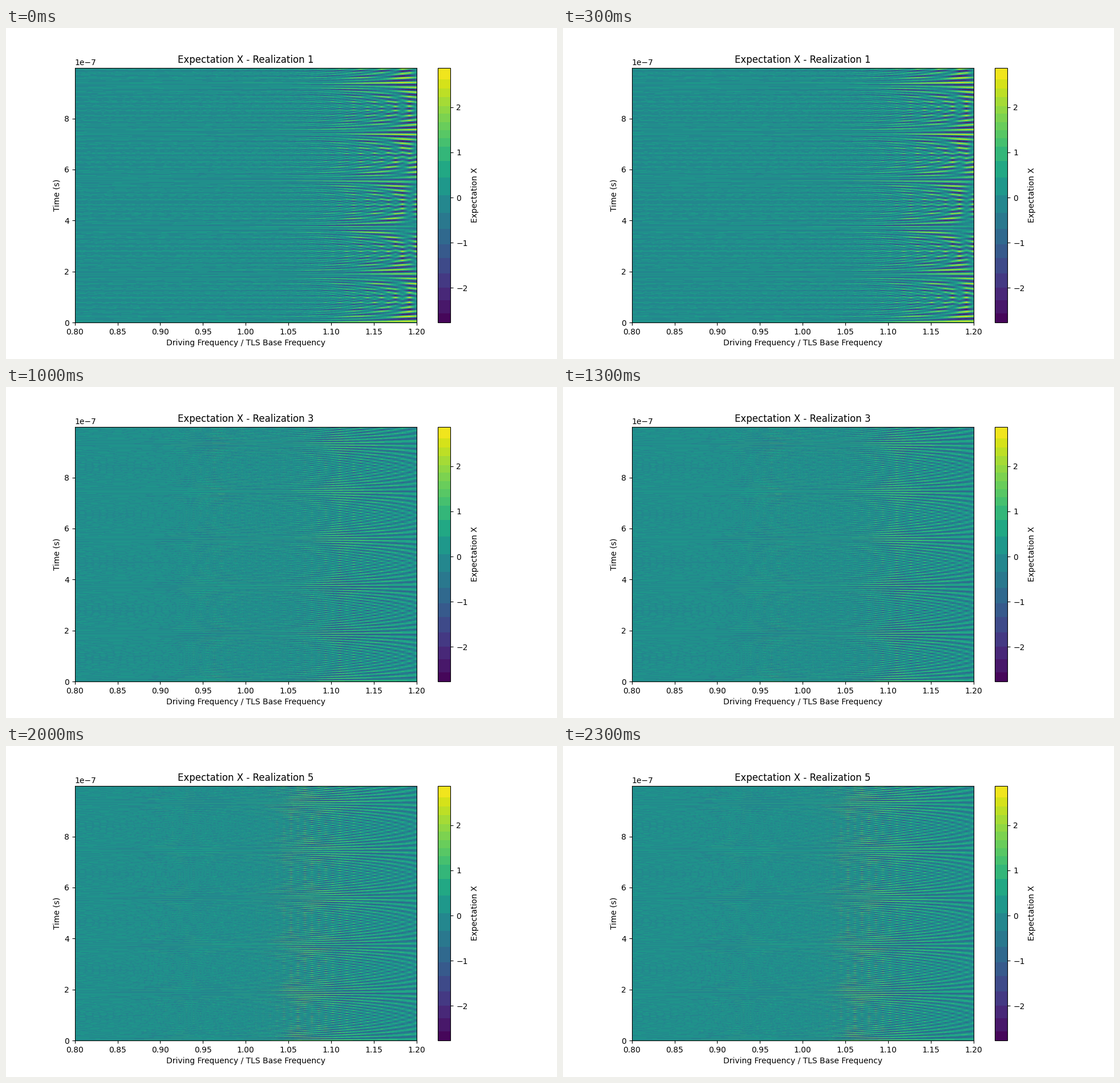
A matplotlib script for the animation above (2.5 s loop, 966x580 px).

```python
import numpy as np
import matplotlib.pyplot as plt
from matplotlib.animation import FuncAnimation
from matplotlib.colors import ListedColormap

V_MIN, V_MAX = -2.77, 2.875
T_END = 0.999e-6
DRIVE_RIGHT, DRIVE_SLOPE = 48e6, 658e6   # Hz at ratio 1.2, Hz per unit ratio

# Per realization: share of free oscillation, then modes as
# (resonance ratio, amplitude, width below, width above)
REALIZATIONS = [
    (1.0, [(1.19, 1.15, 0.030, 0.03), (1.13, 0.45, 0.03, 0.03)]),
    (0.6, [(1.18, 1.05, 0.030, 0.05), (1.02, 0.40, 0.03, 0.03)]),
    (0.2, [(1.11, 1.05, 0.040, 0.08), (0.965, 0.50, 0.025, 0.02)]),
    (0.5, [(1.19, 1.15, 0.040, 0.04), (0.99, 0.35, 0.05, 0.03),
           (0.94, 0.25, 0.03, 0.03)]),
    (0.2, [(1.06, 1.35, 0.018, 0.08), (0.92, 0.35, 0.06, 0.04)]),
]


def banded_viridis():
    """Viridis reduced to flat bands, finer towards yellow."""
    rows = np.array([516, 499, 477, 455, 430, 403, 379, 352, 324, 293, 262,
                     233, 208, 193, 179, 165, 150, 137, 121, 106, 90, 69.6])
    edges = (516 - rows) / (516 - 69.6)
    mids = (edges[1:] + edges[:-1]) / 2
    steps = (np.arange(512) + 0.5) / 512
    band = np.digitize(steps, edges[1:-1])
    return ListedColormap(plt.get_cmap("viridis")(mids[band]))


def drive_freq(ratio):
    return DRIVE_RIGHT + DRIVE_SLOPE * (1.2 - ratio)


def expectation(index):
    """Response on a coarse ratio grid, blended linearly between columns."""
    free, modes = REALIZATIONS[index]
    ratio = np.linspace(0.8, 1.2, 50)
    t = np.linspace(0, T_END, 1000)[:, None]
    driven = np.sin(2 * np.pi * drive_freq(ratio) * t)
    x = np.zeros_like(driven)
    for center, amp, below, above in modes:
        width = np.where(ratio < center, below, above)
        gain = amp * width / np.hypot(ratio - center, width)
        natural = np.sin(2 * np.pi * drive_freq(center) * t)
        x += gain * (driven + free * natural)

    pos = np.linspace(0, 49, 599)
    left = np.minimum(pos.astype(int), 48)
    mix = pos - left
    return x[:, left] * (1 - mix) + x[:, left + 1] * mix


fields = [expectation(i) for i in range(len(REALIZATIONS))]

fig, ax = plt.subplots(figsize=(9.66, 5.8), dpi=100)
image = ax.imshow(fields[0], origin="lower", aspect="auto",
                  extent=(0.8, 1.2, 0, T_END), interpolation="nearest",
                  cmap=banded_viridis(), vmin=V_MIN, vmax=V_MAX)
fig.colorbar(image, ax=ax, label="Expectation X")
ax.set_xlabel("Driving Frequency / TLS Base Frequency")
ax.set_ylabel("Time (s)")
title = ax.set_title("Expectation X - Realization 1")


def draw(frame):
    image.set_data(fields[frame])
    title.set_text(f"Expectation X - Realization {frame + 1}")
    return image, title


anim = FuncAnimation(fig, draw, frames=len(fields), interval=500,
                     repeat=True, repeat_delay=0, blit=False)
plt.show()
```
